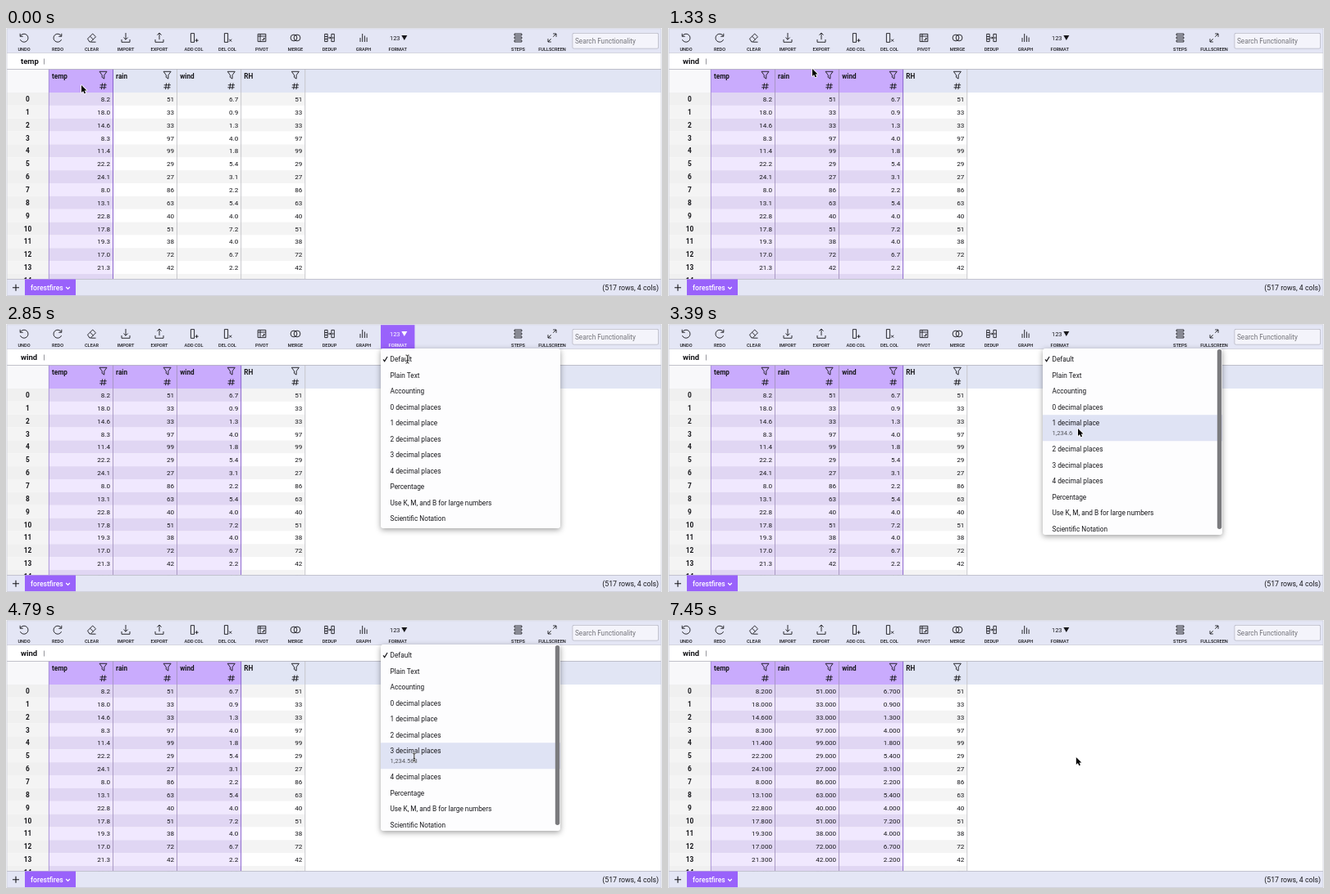
An HTML page with a canvas for the animation above (7480 ms loop, 800x328 px).

```html
<!DOCTYPE html>
<html lang="en">
<head>
<meta charset="utf-8">
<title>Column formatting</title>
<style>
html, body { margin: 0; width: 100%; height: 100%; overflow: hidden; background: #fff; }
canvas { display: block; width: 800px; height: 328px; }
</style>
</head>
<body>
<canvas id="stage"></canvas>
<script>
const W = 800, H = 328, LOOP = 7480;
const canvas = document.getElementById('stage');
const dpr = window.devicePixelRatio || 1;
canvas.width = W * dpr;
canvas.height = H * dpr;
const ctx = canvas.getContext('2d');

const INK = '#17171b', BAR = '#e4e6f5', PURPLE = '#9962fb';
const COL_X = 52.3, COL_W = 78.1, ROW_Y = 79, ROW_H = 15.86;
const MENU = { x: 457, y: 30, w: 219, top: 33.25, step: 19.5, open: 32 };

const temp = [8.2, 18, 14.6, 8.3, 11.4, 22.2, 24.1, 8, 13.1, 22.8, 17.8, 19.3, 17, 21.3, 26.4];
const rain = [51, 33, 33, 97, 99, 29, 27, 86, 63, 40, 51, 38, 72, 42, 21];
const wind = [6.7, 0.9, 1.3, 4, 1.8, 5.4, 3.1, 2.2, 5.4, 4, 7.2, 4, 6.7, 2.2, 4.5];
const columns = [
  { name: 'temp', data: temp, digits: 1 },
  { name: 'rain', data: rain, digits: 0 },
  { name: 'wind', data: wind, digits: 1 },
  { name: 'RH', data: rain, digits: 0 }
];

const formats = ['Default', 'Plain Text', 'Accounting', '0 decimal places', '1 decimal place',
  '2 decimal places', '3 decimal places', '4 decimal places', 'Percentage',
  'Use K, M, and B for large numbers', 'Scientific Notation'];

const undo = 'M-4.8-5.2V-1.7H-1.3M-4.5-2A5 5 0 1 1-4.6 2.2';
const tray = 'M-5 2V5.3H5V2';
const column = 'M-3.6-5.4H.6V5.4H-3.6Z';
const tools = [
  ['UNDO', 22, undo],
  ['REDO', 63, undo, true],
  ['CLEAR', 104.5, 'M-5 1.2L1.2-5L5-1.2L-1.2 5H-2.6ZM-2-1.8L2 2.1M-1 5.2H5'],
  ['IMPORT', 146, tray + 'M0-6V2.2M-2.6-.4L0 2.2L2.6-.4'],
  ['EXPORT', 187, tray + 'M0 2.2V-6M-2.6-3.4L0-6L2.6-3.4'],
  ['ADD COL', 229, column + 'M1.6 3.2H5.6M3.6 1.2V5.2'],
  ['DEL COL', 270, column + 'M2.1 1.7L5.1 4.7M5.1 1.7L2.1 4.7'],
  ['PIVOT', 312, 'M-4.8-4.6H4.8V4.6H-4.8ZM-4.8-2H4.8M-2-4.6V4.6M0 2.6H2.7V0M1.7 1L2.7 0L3.7 1'],
  ['MERGE', 353, 'M1.9 0A3.9 3.9 0 1 1-5.9 0A3.9 3.9 0 1 1 1.9 0M5.9 0A3.9 3.9 0 1 1-1.9 0A3.9 3.9 0 1 1 5.9 0'],
  ['DEDUP', 394.5, 'M-5.8-4.6H-2.4V4.6H-5.8ZM-5.8-1.5H-2.4M-5.8 1.5H-2.4M2.4-4.6H5.8V4.6H2.4ZM2.4 0H5.8M-1.5 0H1.4M.3-1.2L1.4 0L.3 1.2'],
  ['GRAPH', 436, 'M-4 5V0M-1.3 5V-5M1.4 5V-2.5M4.1 5V-.5'],
  ['FORMAT', 477.7, null],
  ['STEPS', 624.5, 'M-4.4-5H4.4V-3H-4.4ZM-4.4-1H4.4V1H-4.4ZM-4.4 3H4.4V5H-4.4Z'],
  ['FULLSCREEN', 666, 'M1.2-5H5V-1.2M5-5L1.3-1.3M-1.2 5H-5V1.2M-5 5L-1.3 1.3']
].map(([label, x, d, flip]) => ({ label, x, flip, icon: d && new Path2D(d) }));

const arrow = new Path2D('M0 0V8.9L2.1 7L3.5 10.3L5.1 9.6L3.7 6.4H6.5Z');
const funnel = new Path2D('M-4.6-4.2H4.4L1.2 .2V4.6L-1.4 2.9V.2Z');
const hash = new Path2D('M-4-1.5H4.2M-4.4 1.5H3.8M-1-3.8L-2.2 3.8M2.2-3.8L1 3.8');

// time, x, y of the pointer
const path = [
  [0, 92, 70], [120, 94, 70], [650, 222, 67], [1000, 222, 66], [1150, 176, 58],
  [1330, 176, 50], [1520, 414, 20], [1680, 476, 14], [2080, 478, 15], [2450, 489.5, 43],
  [2870, 489.5, 43], [3280, 500, 128], [3880, 500, 128], [4420, 497.8, 168], [LOOP, 497.8, 168]
];

function pointer(t) {
  const i = path.findIndex((p, n) => n && t <= p[0]);
  const [t0, x0, y0] = path[i - 1], [t1, x1, y1] = path[i];
  const u = (t - t0) / (t1 - t0), k = u * u * (3 - 2 * u);
  return { x: x0 + (x1 - x0) * k, y: y0 + (y1 - y0) * k };
}

function rect(x, y, w, h, color) {
  ctx.fillStyle = color;
  ctx.fillRect(x, y, w, h);
}

function font(size, weight = 400) {
  ctx.font = `${weight} ${size}px Roboto, "Open Sans", sans-serif`;
}

function text(s, x, y, size, { weight = 400, color = INK, align = 'left' } = {}) {
  font(size, weight);
  ctx.fillStyle = color;
  ctx.textAlign = align;
  ctx.fillText(s, x, y);
}

function strokeAt(shape, x, y, color = INK, width = 0.9, flip = false) {
  ctx.save();
  ctx.translate(x, y);
  if (flip) ctx.scale(-1, 1);
  ctx.strokeStyle = color;
  ctx.lineWidth = width;
  ctx.stroke(shape);
  ctx.restore();
}

function box(x, y, w, h, r, fill) {
  ctx.beginPath();
  ctx.roundRect(x, y, w, h, r);
  ctx.fillStyle = fill;
  ctx.fill();
}

function drawToolbar(hot) {
  rect(1, 1, 798, 29.5, BAR);
  for (const tool of tools) {
    const on = tool.label === hot, color = on ? '#fff' : INK;
    if (on) rect(tool.x - 20.7, 1, 41.4, 29.5, PURPLE);
    if (tool.icon) {
      strokeAt(tool.icon, tool.x, 12, color, 0.9, tool.flip);
    } else {
      text('123', 468, 15, 7.4, { color });
      ctx.beginPath();
      ctx.moveTo(482.3, 9);
      ctx.lineTo(489.3, 9);
      ctx.lineTo(485.8, 15);
      ctx.fill();
    }
    text(tool.label, tool.x, 27.8, 5.6, { weight: 500, color, align: 'center' });
  }
  box(690.5, 6, 105.5, 19.5, 2, '#b9bac6');
  box(691.3, 6.8, 103.9, 17.9, 1.5, '#f4f4fb');
  text('Search Functionality', 694, 19, 8.2, { color: '#74747a' });
}

function drawFormulaBar(name) {
  rect(1, 30, 798, 0.8, '#cfd0da');
  text(name, 18, 44.2, 9.5, { weight: 700 });
  rect(46, 37.5, 0.9, 7, '#8c8c92');
}

function drawGrid(selected, formatted) {
  ctx.save();
  ctx.beginPath();
  ctx.rect(1, 50, 798, 257.5);
  ctx.clip();
  rect(1, 50, 51, 29, '#f8f8fa');
  rect(COL_X, 50, 800 - COL_X, 29, '#e1e5f4');
  for (let r = 0; r < 15; r++) {
    const y = ROW_Y + r * ROW_H;
    rect(1, y, 51, ROW_H, r % 2 ? '#f4f4f4' : '#f0f0f0');
    text(r, 26.5, y + 11, 8.3, { weight: 700, align: 'center' });
  }
  columns.forEach((col, c) => {
    const x = COL_X + c * COL_W, on = c <= selected;
    if (on) rect(x, 50, COL_W, 29, '#c9abfd');
    text(col.name, x + 3.7, 62.4, 8.2, { weight: 700 });
    strokeAt(funnel, x + 66.3, 57.5);
    strokeAt(hash, x + 66.3, 71.3);
    const fill = on ? ['#e0d6f3', '#f0e8fe'] : ['#f4f4f4', '#ffffff'];
    const digits = formatted && on ? 3 : col.digits;
    col.data.forEach((v, r) => {
      const y = ROW_Y + r * ROW_H;
      rect(x, y, COL_W, ROW_H + 0.1, fill[r % 2]);
      text(v.toFixed(digits), x + 74.7, y + 11, 8.1, { align: 'right' });
    });
  });
  rect(51.9, 50, 0.8, 258, '#9a7fd0');
  columns.forEach((col, c) => {
    const x = COL_X + (c + 1) * COL_W;
    rect(x - 0.4, 50, 0.9, 258, c === selected ? '#8257c9' : c < selected ? '#a494bf' : '#c3c3c8');
  });
  ctx.restore();
  rect(1, 50, 798, 0.8, '#b4b5bf');
}

function drawFooter() {
  rect(1, 307.2, 798, 20, BAR);
  rect(1, 307, 798, 0.8, '#b9bac6');
  rect(23, 307.5, 62, 19.7, PURPLE);
  strokeAt(new Path2D('M-4 0H4M0-4V4'), 12, 317.7, INK, 1.1);
  text('forestfires', 30, 320.8, 8.6, { weight: 500, color: '#fff' });
  strokeAt(new Path2D('M-2.3-1.2L0 1.2L2.3-1.2'), 75.5, 318.2, '#fff', 1.2);
  text('(517 rows, 4 cols)', 796, 320.8, 8.7, { align: 'right' });
}

function sample(i) {
  if (i < 3 || i > 7) return '';
  const digits = i - 3;
  return (1234.563).toLocaleString('en-US', { minimumFractionDigits: digits, maximumFractionDigits: digits });
}

function drawMenu(hover) {
  const tall = hover >= 0 && sample(hover) !== '';
  const h = tall ? 228 : 220;
  ctx.save();
  ctx.shadowColor = 'rgba(0,0,0,.38)';
  ctx.shadowBlur = 7 * dpr;
  ctx.shadowOffsetY = 2 * dpr;
  box(MENU.x, MENU.y, MENU.w, h, 3, '#fdfdfe');
  ctx.restore();
  ctx.save();
  ctx.beginPath();
  ctx.roundRect(MENU.x, MENU.y, MENU.w, h, 3);
  ctx.clip();
  let y = MENU.top;
  formats.forEach((label, i) => {
    const on = i === hover, open = on && tall;
    const rowH = open ? MENU.open : MENU.step;
    if (on) rect(MENU.x, y, MENU.w, rowH, '#dfe3f4');
    text(label, 468.5, y + 12.8, 8.26);
    if (open) text(sample(i), 468.5, y + 25, 7.6, { color: '#55565c' });
    y += rowH;
  });
  strokeAt(new Path2D('M-2.5 .3L-.8 2.6L2.6-3'), 462.5, 43, INK, 1.2);
  if (tall) box(669.8, 31, 5.4, 220, 2.7, '#7b7b7e');
  ctx.restore();
}

function overText(p, hover) {
  const i = Math.floor((p.y - MENU.top) / MENU.step);
  if (i < 0 || i >= formats.length) return false;
  const mid = MENU.top + i * MENU.step + 9.75;
  const hits = (s, size, y, reach) => {
    font(size);
    return Math.abs(p.y - y) <= reach && p.x < 468.5 + ctx.measureText(s).width;
  };
  return hits(formats[i], 8.26, mid, 5) || (i === hover && hits(sample(i), 7.6, mid + 12.3, 5.2));
}

function drawPointer(p, beam) {
  ctx.save();
  ctx.translate(p.x, p.y);
  ctx.lineJoin = 'round';
  if (beam) {
    const bar = new Path2D('M-2-5Q0-5 0-3.8Q0-5 2-5M0-4V4M-2 5Q0 5 0 3.8Q0 5 2 5M-1 1.4H1');
    ctx.strokeStyle = '#fff';
    ctx.lineWidth = 1.9;
    ctx.stroke(bar);
    ctx.strokeStyle = '#111';
    ctx.lineWidth = 0.9;
    ctx.stroke(bar);
  } else {
    ctx.strokeStyle = '#fff';
    ctx.lineWidth = 1.5;
    ctx.stroke(arrow);
    ctx.fillStyle = '#000';
    ctx.fill(arrow);
  }
  ctx.restore();
}

function draw(t) {
  const p = pointer(t);
  const selected = t < 300 ? 0 : t < 590 ? 1 : 2;
  const menuOpen = t >= 1950 && t < 5000;
  const hover = menuOpen && t >= 2920 ? Math.floor((p.y - MENU.top) / MENU.step) : -1;
  let hot = '';
  if (t >= 1950 && t < 2920) {
    hot = 'FORMAT';
  } else if (p.y < 30) {
    const tool = tools.find(b => Math.abs(p.x - b.x) < 20.7);
    if (tool) hot = tool.label;
  }

  ctx.setTransform(dpr, 0, 0, dpr, 0, 0);
  rect(0, 0, W, H, '#fff');
  drawToolbar(hot);
  drawFormulaBar(columns[selected].name);
  drawGrid(selected, t >= 5060);
  drawFooter();
  ctx.strokeStyle = '#c9cad6';
  ctx.lineWidth = 0.8;
  ctx.strokeRect(1, 0.8, 798, 326.6);
  if (menuOpen) drawMenu(hover);
  drawPointer(p, menuOpen && overText(p, hover));
}

const start = performance.now();
function frame() {
  draw((performance.now() - start) % LOOP);
  requestAnimationFrame(frame);
}
frame();
</script>
</body>
</html>
```
